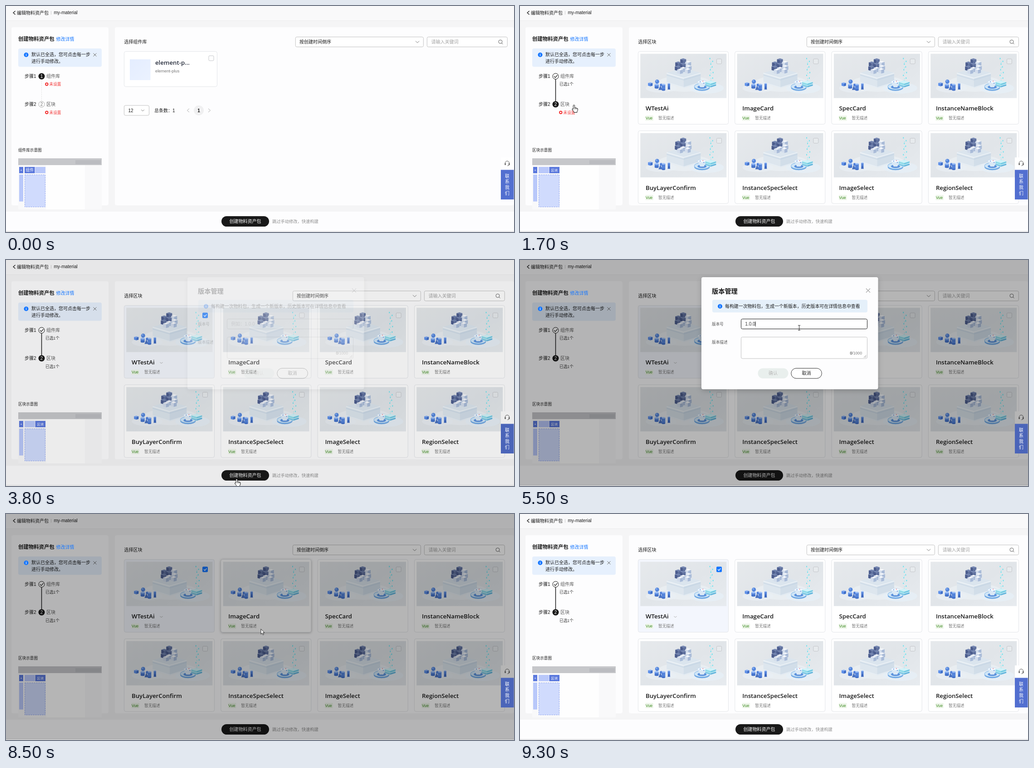
An HTML page that plays this animation: 1120x500 px, repeating every 10 s.

```html
<!DOCTYPE html>
<html lang="zh-CN">
<head>
<meta charset="utf-8">
<title>物料资产包</title>
<style>
html, body { margin: 0; width: 100%; height: 100%; overflow: hidden; background: #f5f5f6; }
svg { display: block; font-family: "Liberation Sans", "Noto Sans CJK SC", "Noto Sans CJK", sans-serif; }
text { white-space: pre; }
.name { font-family: "Open Sans", "Noto Sans", sans-serif; font-weight: 600; }
.hover { filter: drop-shadow(0 1px 2.5px rgba(0,0,0,.28)); }
.modal-box { filter: drop-shadow(0 3px 6px rgba(0,0,0,.2)); }
</style>
</head>
<body>
<svg id="stage" width="1120" height="500" viewBox="0 0 1120 500"></svg>
<script>
const LOOP = 10000;
const INK = '#191919', BLUE = '#1476ff', RED = '#f23030';

// Shape helpers; text is placed by its vertical centre.
const text = (x, cy, s, size = 10, fill = INK, extra = '') =>
  `<text x="${x}" y="${cy + size * 0.36}" font-size="${size}" fill="${fill}" ${extra}>${s}</text>`;
const rect = (x, y, w, h, fill, r = 0, extra = '') =>
  `<rect x="${x}" y="${y}" width="${w}" height="${h}" rx="${r}" fill="${fill}" ${extra}/>`;
const box = (x, y, w, h, stroke, r = 3, extra = '') =>
  rect(x, y, w, h, '#fff', r, `stroke="${stroke}" ${extra}`);
const line = (d, stroke, w = 1, extra = '') =>
  `<path d="${d}" fill="none" stroke="${stroke}" stroke-width="${w}" ${extra}/>`;
const poly = (pts, fill) => `<polygon points="${pts}" fill="${fill}"/>`;
const disc = (x, y, r, fill, extra = '') => `<circle cx="${x}" cy="${y}" r="${r}" fill="${fill}" ${extra}/>`;
const oval = (x, y, rx, ry, fill, extra = '') =>
  `<ellipse cx="${x}" cy="${y}" rx="${rx}" ry="${ry}" fill="${fill}" ${extra}/>`;
const group = (id, body, extra = '') => `<g id="${id}" ${extra}>${body}</g>`;
const cross = (x, y, r) => line(`M${x - r} ${y - r}l${2 * r} ${2 * r}m0 ${-2 * r}l${-2 * r} ${2 * r}`, '#666');
const down = (x, y, r, c = '#777') => line(`M${x - r} ${y - r / 2}l${r} ${r}l${r} ${-r}`, c);
const mid = 'text-anchor="middle"', bold = 'font-weight="700"';

const info = (x, y) => disc(x, y, 5, BLUE) + rect(x - .6, y - 1, 1.2, 3.6, '#fff') + rect(x - .6, y - 2.9, 1.2, 1.2, '#fff');
const checkbox = (x, y, id) => box(x, y, 11, 11, '#c4c6ca', 2, 'fill-opacity=".2"') +
  group(id, rect(x - .5, y - .5, 12, 12, BLUE, 2) + line(`M${x + 2.5} ${y + 5.5}l2.4 2.5l4-4.6`, '#fff', 1.3));

// Isometric cube: top-left corner of its bounds, half width, height of sides.
const cube = (x, y, w, h, top, left, right) => {
  const d = w * .3;
  return poly(`${x},${y + d} ${x + w},${y} ${x + 2 * w},${y + d} ${x + w},${y + 2 * d}`, top) +
    poly(`${x},${y + d} ${x + w},${y + 2 * d} ${x + w},${y + 2 * d + h} ${x},${y + d + h}`, left) +
    poly(`${x + w},${y + 2 * d} ${x + 2 * w},${y + d} ${x + 2 * w},${y + d + h} ${x + w},${y + 2 * d + h}`, right);
};
const navy = (x, y) => cube(x, y, 6.5, 8, '#7486b2', '#4c5d8e', '#5f719f');
const pale = (x, y) => cube(x, y, 6.5, 8, '#f8fafd', '#d3ddec', '#a9bbd8');
const peg = (x, y, w, h) => rect(x - w, y, 2 * w, h, '#5584da') + oval(x, y + h, w, w * .45, '#4270c8') + oval(x, y, w, w * .45, '#9dc0f8');

function picture() {
  let s = rect(0, 0, 190, 98, 'url(#sky)');
  s += oval(97, 66, 60, 18, '#eef3f7', 'opacity=".6"') + oval(46, 76, 34, 10, '#eaf0f6', 'opacity=".7"') + oval(146, 76, 38, 12, '#e6f1f8', 'opacity=".8"');
  // Glass base
  s += cube(58, 31, 37.500, 22, '#dbe5ee', '#dde6ee', '#d2dee9');
  s += line('M58 43L95.500 54L133 43', '#f4f8fb', 1.2) + line('M58 47L95.500 58L133 47', '#b7cbdf', .7);
  s += line('M58 63L95.500 74.500L133 63', '#eef4f9', 1.2);
  // Stacked cubes, back to front
  s += navy(88, 10) + navy(77, 17) + pale(99, 16) + navy(87, 20);
  s += navy(76, 26) + pale(100, 25) + pale(88, 29) + pale(81, 33) + pale(98, 32);
  for (let i = 0; i < 9; i++) {
    s += rect(152.500 + (i % 2) * 5 + (i % 3), 9 + i * 6.2, 1.8, 3, '#5ee3f0', .5);
    if (i % 2) s += rect(155, 12 + i * 6, 1.2, 2, '#8ceaf4');
  }
  s += cube(17, 63, 5, 6, '#8db4f7', '#5d8fe8', '#3f6fca');
  s += peg(36, 68, 4.5, 7) + disc(37, 61.500, 4.5, '#5586dc') + disc(35.8, 60, 1.8, '#86aff2') + disc(46, 69, 3, '#4f7ed8');
  s += poly('40,80 44,70 49,80', '#4a72c0') + peg(51, 68, 4, 12) + peg(63, 66, 2.6, 10) + poly('60,79 62,72 64,72 66,79', '#3e68be');
  s += oval(136, 75, 17, 7, '#6fa6e2') + oval(136, 72.500, 17, 7, '#cfe5f7', 'stroke="#6aaae6" stroke-width=".8"') + oval(136, 73.500, 10, 3.8, '#5c92dc');
  s += poly('126,62 146,62 140,74 132,74', '#dbe9f6') + oval(136, 62, 10, 3.2, '#f2f8fd', 'stroke="#b5d6f0" stroke-width=".6"');
  s += disc(132, 62, 1, '#4a7edc') + disc(138, 60.5, 1, '#f07f86') + disc(140, 65, 1, '#4a7edc');
  s += cube(143, 64, 12, 3, '#b2e4f0', '#7ac8e4', '#62b4dc') + cube(143, 59, 12, 3, '#d0f2f8', '#8adbe9', '#70c8e2');
  return s;
}

const NAMES = ['WTestAi', 'ImageCard', 'SpecCard', 'InstanceNameBlock', 'BuyLayerConfirm', 'InstanceSpecSelect', 'ImageSelect', 'RegionSelect'];
const spots = NAMES.map((_, i) => [260.5 + (i % 4) * 213.3, i < 4 ? 100.5 : 276, 199, 161]);

const card = (name, i) => {
  const [x, y, w, h] = spots[i];
  return group('card' + i,
    rect(x, y, w, h, '#fff', 4, `id="face${i}" stroke="#e3e5e9"`) +
    `<use href="#pic" x="${x + 4.8}" y="${y + 5.2}"/>` +
    checkbox(x + 173, y + 16.500, 'tick' + i) +
    text(x + 16.5, y + 125.8, name, 13.2, INK, 'class="name"') +
    rect(x + 16, y + 142, 17.5, 11.5, '#eff6eb', 1) +
    text(x + 16.5, y + 147.8, 'Vue', 8.67, '#3c8a20') +
    text(x + 44.5, y + 147.5, '暂无描述', 8.67, '#777'));
};

const filters = x =>
  box(x + .3, 68.5, 282, 22, '#c2c2c2') + text(x + 9, 79.5, '按创建时间倒序') + down(x + 269, 79.5, 4) +
  box(x + 290.3, 68.5, 177, 22, '#c2c2c2') + text(x + 299.5, 79.5, '请输入关键词', 10, '#a2a2a2') +
  disc(x + 452, 79, 4, 'none', 'stroke="#666"') + line(`M${x + 455} 82l2.5 2.5`, '#666');

const unset = y => disc(89.8, y, 2.7, '#fff', `stroke="${RED}" stroke-width="2"`) + text(95.5, y, '未设置', 8.67, RED);
const chosen = y => text(87, y, '已选1个', 8.67, '#333');
const tag = (x, label, size) => rect(x, 356, 22.5, 14, '#5b79dd') + text(x + 11.2, 363, label, size, '#fff', mid);
const soft = x => rect(x, 356, 22.5, 14, '#b9c8fa');

const header =
  rect(0, 0, 1120, 32, '#f9f9fa') + rect(0, 32, 1120, 1, '#ececee') +
  line('M20.5 11l-4.5 4l4.5 4', INK, 1.3) + text(24, 15, '编辑物料资产包', 10, INK, 'font-weight="500"') +
  rect(99, 11, 1, 8, '#ccc') + text(105.5, 14.6, 'my-material');

const sidebar =
  rect(12, 47, 214, 394, '#fdfdfe', 4) + text(27, 72.5, '创建物料资产包', 11.4, INK, bold) +
  rect(27, 94, 184, 40.5, '#e6f0fd', 4) +
  text(56, 107.5, '默认已全选，您可点击每一步') + text(56, 122.5, '进行手动修改。') + cross(196, 108, 3.5) +
  text(41, 155.5, '步骤1') + text(89, 155.5, '组件库', 10, '#555') +
  text(41, 217.5, '步骤2') + text(89, 217.5, '区块', 10, '#555') +
  rect(27, 352, 184, 98, '#f9f9fa') + rect(88, 352, 86, 98, '#fefefe') +
  rect(27, 337, 184, 15, '#c6c7ca') + rect(153, 341, 56, 9, '#bbbcc0') +
  rect(29, 356, 9, 14, '#5b79dd') + text(33.5, 363, '+', 8, '#fff', mid) + rect(29, 373, 9, 59.5, '#b9c8fa') +
  rect(41.5, 373.5, 45, 71, '#d0dbfd', 0, 'stroke="#8ea4f0" stroke-dasharray="3 2"') +
  group('none1', unset(173)) + group('some1', chosen(173)) +
  group('none2', unset(235.5)) + group('some2', chosen(235.5)) +
  group('stepA',
    line('M78.5 163V210', '#ddd', 1, 'stroke-dasharray="2 2"') +
    disc(78.5, 155.5, 7, INK) + text(78.5, 155.5, '1', 10, '#fff', mid) +
    disc(78.5, 217.5, 6.5, '#fff', 'stroke="#aaa"') + text(78.5, 217.5, '2', 10, '#777', mid) +
    text(27, 318.5, '组件库示意图', 8.6) + tag(41, '组件', 8.67) + soft(64.5)) +
  group('stepB',
    line('M78.5 162V211', INK, 1.5) +
    disc(78.5, 155.5, 6.5, '#fff', `stroke="${INK}"`) + line('M75 155.5l2.7 2.8l4.8-5.3', INK, 1.2) +
    disc(78.5, 217.5, 7, INK) + text(78.5, 217.5, '2', 10, '#fff', mid) +
    text(27, 318.5, '区块示意图', 8.6) + soft(41) + tag(64.5, '区块', 7.3));

const pageA = group('pageA',
  text(260.5, 79.5, '选择组件库') + filters(638) +
  group('lib', rect(260.5, 100.5, 205, 78, '#fff', 4, 'id="libFace" stroke="#e3e5e9"') +
    rect(273, 118, 45.5, 46, 'url(#thumb)') + checkbox(447, 110, 'libTick') +
    text(329, 125, 'element-p...', 13.2, '#252b3a', 'class="name"') + text(329, 144, 'element-plus', 9.33, '#777')) +
  box(260.5, 220, 55, 22, '#c2c2c2') + text(269.5, 231, '12') + down(301.5, 231, 3.2) +
  text(327, 231, '总条数：1') + line('M404 227l-4.5 4l4.5 4', '#aaa') +
  disc(425, 231, 11, '#f0f0f1') + text(425, 231, '1', 10, INK, mid + ' ' + bold) + line('M446 227l4.5 4l-4.5 4', '#aaa'));

const pageB = group('pageB',
  text(260.5, 79.5, '选择区块') + filters(632) + NAMES.map(card).join('') +
  group('more', down(342.5, 227.5, 3, '#aaa')));

const footer =
  rect(0, 455, 1120, 45, '#fdfdfe') + rect(0, 498.3, 1120, 1, '#cdcdd0') +
  rect(475, 465, 105, 23, INK, 11.5, 'id="create"') + text(527.5, 476.5, '创建物料资产包', 10, '#fff', mid) +
  text(587, 476.5, '跳过手动修改，快速构建', 9.25, '#8e8e8e');

const helpTop = rect(1091, 335, 29, 28, '#fff') +
  line('M1100.5 349v-1.5a4.5 4.5 0 0 1 9 0v1.5M1109.5 350q0 3.5-4 3.5', '#555') +
  rect(1099.5, 347.5, 2.3, 4.5, '#555', 1) + rect(1108.2, 347.5, 2.3, 4.5, '#555', 1);
const helpTab = rect(1091, 362.5, 28.5, 65.5, '#526fd0', 0, 'id="tab"') +
  [...'联系我们'].map((c, i) => text(1105, 376 + i * 12.8, c, 10, '#fff', mid)).join('');

const modal = group('modal',
  group('dialog', rect(400, 38, 389.5, 248, '#fdfdfe', 4), 'class="modal-box"') +
  text(423, 69, '版本管理', 14.2, INK, bold) + cross(767.5, 67.5, 4.5) +
  rect(424, 88, 342, 28, '#e5f0fa', 4) + info(441, 102.5) +
  text(452, 102.3, '每构建一次物料包，生成一个新版本，历史版本可在详情信息中查看', 9.93) +
  text(423, 141.5, '版本号', 8.67, '#555') + text(423, 181.5, '版本描述', 8.67, '#555') +
  box(487.5, 130.5, 278, 22, '#c2c2c2', 3, 'id="field"') +
  text(496.3, 141.8, '例如：1.0.0', 10, '#b0b0b0', 'id="hint"') + text(496.3, 141.8, '', 10, '#333', 'id="version"') +
  box(487.5, 170.5, 278, 47.5, '#c2c2c2', 3, 'id="area"') + text(496, 183.8, '', 10, '#333', 'id="note"') +
  `<text x="754" y="209" font-size="8.67" fill="#777" text-anchor="end"><tspan id="count" fill="#191919">0</tspan>/1000</text>` +
  line('M758 216l5.5-5.5m-2.5 5.5l2.5-2.5', '#777', .8) +
  rect(496, 136, 1, 11, INK, 0, 'id="caret"') +
  rect(524.5, 239.5, 67, 22.5, '#e9efed', 11.2, 'id="ok"') + text(558, 250.8, '确认', 10, '#b8b8b8', mid + ' id="okText"') +
  box(597.8, 239.5, 67.5, 22.5, '#333', 11.2) + text(631.5, 250.8, '取消', 10, INK, mid));

const pointer = group('pointer',
  group('arrow', '<path d="M0 0V11.3L2.6 8.9L4.5 13L6.3 12.2L4.5 8.2H8Z" fill="#fff" stroke="#111" stroke-width=".9"/>') +
  group('hand', '<path d="M-1.6 1.2Q-1.4 0 0 0T1.6 1.2V6Q3 5.2 4 6.5Q5.4 5.8 6.3 7.2Q8.3 6.8 8.3 9V11.5L6.8 14.5V16.5H-.2V14.8L-4 10Q-4.4 8.2-2.8 8.4L-1.6 9.5Z" fill="#fff" stroke="#111"/>' +
    line('M1.6 6v3.500M4 6.500v3M6.3 7.2v2.300', '#111', .8)) +
  group('beam', line('M-2.5-5.5h2l.5.5l.5-.5h2M0-5V5M-2.5 5.5h2l.5-.5l.5.5h2', '#222')));

const $ = id => document.getElementById(id);
$('stage').innerHTML =
  `<defs><linearGradient id="sky" x2="1" y2="1"><stop stop-color="#e6e9ec"/><stop offset=".5" stop-color="#e1e5e9"/><stop offset="1" stop-color="#e7ebef"/></linearGradient>
  <linearGradient id="thumb" x2="1" y2="1"><stop stop-color="#e4edff"/><stop offset="1" stop-color="#ebf2ff"/></linearGradient>
  <g id="pic">${picture()}</g></defs>` +
  rect(0, 0, 1120, 500, '#f5f5f6') + header + sidebar + rect(240, 47, 880, 394, '#fdfdfe', 4) +
  pageA + pageB + footer + helpTop +
  rect(0, 0, 1120, 499, '#000', 0, 'id="shade"') +
  text(110.5, 73.5, '修改详情', 10, BLUE) + info(44.5, 108) + helpTab + modal + pointer;

const show = (id, on) => $(id).setAttribute('display', on ? 'inline' : 'none');
const set = (id, key, v) => $(id).setAttribute(key, v);
const clamp = v => Math.max(0, Math.min(1, v));
const inside = (p, [x, y, w, h]) => p[0] >= x && p[0] <= x + w && p[1] >= y && p[1] <= y + h;

// Pointer path: time, x, y
const PATH = [
  [200, 981, 57], [600, 452, 115], [1000, 452, 115], [1400, 118, 215], [1600, 118, 215], [1700, 119, 219],
  [2200, 439, 121], [2500, 439, 121], [3500, 508.5, 484.5], [3900, 508.5, 484.5], [4700, 615.5, 150],
  [5900, 615.5, 150], [6300, 611, 194.5], [7800, 611, 194.5], [8200, 562, 254.5], [8900, 562, 254.5], [9300, 1120, 292]];
const LIB = [260, 100, 206, 79], CREATE = [475, 465, 105, 24], OK = [524, 239, 68, 23];
const FIELD = [487, 130, 279, 23], AREA = [487, 170, 279, 48], STEPS = [40, 145, 95, 95];
const TYPED = [4900, 5100, 5200, 5300, 5500];
const ADVANCE = [0, 5.56, 8.34, 13.9, 16.68, 22.24];

function pointAt(t) {
  let i = 0;
  while (i < PATH.length - 2 && t >= PATH[i + 1][0]) i++;
  const [a, b] = [PATH[i], PATH[i + 1]];
  const u = clamp((t - a[0]) / (b[0] - a[0]));
  const e = u * u * (3 - 2 * u);
  return [a[1] + (b[1] - a[1]) * e, a[2] + (b[2] - a[2]) * e];
}

function drawModal(t, p) {
  const n = TYPED.filter(k => t >= k).length;
  const inField = t >= 4700 && t < 6300, inArea = t >= 6300, noted = t >= 7800;
  show('hint', n === 0);
  $('version').textContent = '1.0.0'.slice(0, n);
  $('note').textContent = noted ? 'a' : '';
  $('count').textContent = noted ? '1' : '0';
  set('field', 'stroke', inField ? INK : '#c2c2c2');
  set('area', 'stroke', inArea ? INK : '#c2c2c2');
  show('caret', inField ? t < 6000 : inArea && (t < 6800 || t >= 7300) && t < 8200);
  set('caret', 'x', inField ? 496 + ADVANCE[n] + (n ? .3 : 0) : noted ? 501.3 : 496);
  set('caret', 'y', inField ? 136 : 178);
  set('ok', 'fill', !noted ? '#e9efed' : t < 7900 ? '#8c8c8c' : inside(p, OK) ? '#595959' : INK);
  set('ok', 'stroke', noted && t < 7900 ? '#6c6c6c' : 'none');
  set('okText', 'fill', !noted ? '#b8b8b8' : t < 7900 ? '#dedede' : '#fff');
}

function draw(ms) {
  const t = Math.floor(ms / 100) * 100;
  const p = pointAt(t);
  const second = t >= 1700, picked = t >= 1000, block = t >= 2500;
  const masked = t >= 3800 && t < 8700, open = t >= 3800 && t < 8500;
  const seen = t >= 200 && t < 9300, free = seen && !open;

  show('pageA', !second); show('stepA', !second);
  show('pageB', second); show('stepB', second);
  show('none1', !picked); show('some1', picked);
  show('none2', !block); show('some2', block);
  show('libTick', picked);
  set('libFace', 'fill', picked ? '#f3f6fd' : '#fff');
  set('lib', 'class', free && inside(p, LIB) ? 'hover' : '');
  spots.forEach((s, i) => {
    show('tick' + i, i === 0 && block);
    set('card' + i, 'class', free && inside(p, s) ? 'hover' : '');
  });
  set('face0', 'fill', block ? '#f3f6fd' : '#fff');
  show('more', block);
  set('create', 'fill', free && inside(p, CREATE) ? '#595959' : INK);

  const fade = clamp((t - 3700) / 400);
  show('shade', masked);
  set('shade', 'opacity', .29 * fade);
  set('tab', 'fill', masked ? '#4b65b9' : '#526fd0');
  show('modal', open);
  set('modal', 'opacity', t < 8200 ? fade : clamp((8500 - t) / 300));
  drawModal(t, p);

  const beam = open && t >= 4100 && (inside(p, FIELD) || inside(p, AREA));
  const hot = open ? (t < 4000 ? [CREATE] : [OK])
    : second ? [CREATE, STEPS, [432, 116, 14, 14]] : [STEPS, [446, 109, 14, 14]];
  const hand = !beam && hot.some(r => inside(p, r));
  show('pointer', seen);
  show('beam', beam); show('hand', hand); show('arrow', !beam && !hand);
  set('pointer', 'transform', `translate(${p[0].toFixed(1)} ${p[1].toFixed(1)})`);
}

const start = performance.now();
function tick() {
  draw((performance.now() - start) % LOOP);
  requestAnimationFrame(tick);
}
tick();
</script>
</body>
</html>
```
